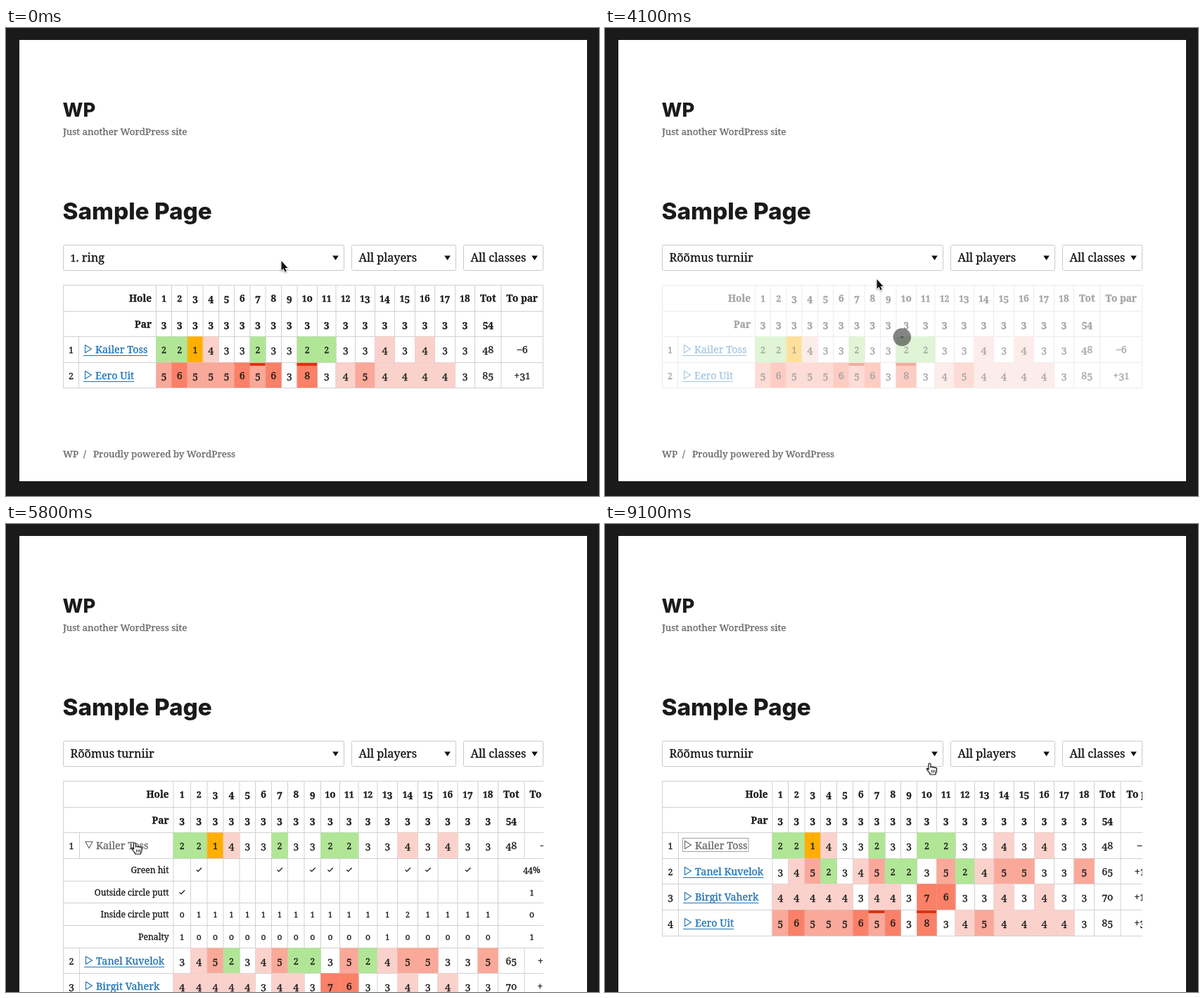
Write an HTML page with a canvas that moves like this. It is 843x665 px and loops after 9400 ms.

```html
<!DOCTYPE html>
<html lang="en">
<head>
<meta charset="utf-8">
<title>Sample Page</title>
<style>
html, body { margin: 0; width: 100%; height: 100%; overflow: hidden; background: #1a1a1a; }
canvas { display: block; width: 843px; height: 665px; }
</style>
</head>
<body>
<canvas id="stage" width="843" height="665"></canvas>
<script>
const ctx = document.getElementById('stage').getContext('2d');
const LOOP = 9400, STEP = 100;
const SERIF = '"Noto Serif", serif';
const INK = '#1a1a1a', GREY = '#686868', LINE = '#d1d1d1', LINK = '#1f73b4';

const T = { pick: 1800, faded: 2600, swap: 4200, shown: 4500, hover: 5300, open: 5800, close: 7900, leave: 8700 };

const players = {
  a: { name: 'Kailer Toss', scores: '221433233223343433', total: '48', par: '−6' },
  b: { name: 'Tanel Kuvelok', scores: '345234522352455335', total: '65', par: '+11' },
  c: { name: 'Birgit Vaherk', scores: '444443443763343433', total: '70', par: '+16' },
  d: { name: 'Eero Uit', scores: '565556563834544443', total: '85', par: '+31', marks: [6, 9] }
};

// v marks a tick, a blank leaves the cell empty
const details = [
  ['Green hit', ' v    v vvv  vv v ', '44%'],
  ['Outside circle putt', 'v                 ', '1'],
  ['Inside circle putt', '011111111111121111', '0'],
  ['Penalty', '100000000000100000', '1']
];

// Left edge of each column, then the right edge of the table
const layouts = {
  small: [81, 103, 213, 235, 257.5, 279.5, 302, 324, 346.5, 368.5, 391, 413.5, 442, 468.5, 496, 524, 552, 581, 609, 638, 666, 703.5, 763],
  wide: [81, 104, 237.5, 260, 283.5, 306, 329, 352, 374.5, 397.5, 420, 443, 471, 497.5, 525, 552.5, 581, 610, 638, 666.5, 695, 732.5, 794],
  open: [81, 104, 237.5, 262, 285.5, 308.5, 331.5, 354, 377, 400, 423.5, 447, 474, 500.5, 527.5, 556, 585, 613.5, 641.5, 670.5, 699, 736.5, 796]
};

const pointerKeys = [
  [0, 391, 331], [200, 390, 338], [900, 390, 338], [1100, 388, 344], [1300, 388, 344],
  [1500, 386, 357], [4700, 386, 357], [5000, 214, 430], [5400, 183.5, 453],
  [8600, 183.5, 453], [9100, 462, 340]
];

const arrowShape = new Path2D('M.5 0V13.5L3.4 10.8L5.6 15.6L7.8 14.6L5.6 10H9.6Z');
const handShape = new Path2D('M-2 9V1.5a1.5 1.5 0 0 1 3 0V6q0-1 1.5-1t1.6 1.2q0-.8 1.4-.8t1.5 1.3' +
  'q0-.6 1.2-.6t1.3 1.5V11q0 2-1.5 3.5V16H0V14.5q-2-2-4-5q-1.2-2 .2-2.5Z');
const handLines = new Path2D('M2.2 9.5v4M4.6 9.5v4M7 9.5v4');

const clamp = v => Math.max(0, Math.min(1, v));
const smooth = u => u * u * (3 - 2 * u);

function rect(x, y, w, h, color) {
  ctx.fillStyle = color;
  ctx.fillRect(x, y, w, h);
}

function polygon(points) {
  ctx.beginPath();
  points.forEach(([x, y]) => ctx.lineTo(x, y));
  ctx.closePath();
}

// Splits text into parts so that figures sit in old style
function parts(str, size, weight) {
  return str.split(/(\d)/).filter(Boolean).map(s => {
    const low = /^[12]$/.test(s);
    const text = s === '0' ? 'o' : s;
    const font = `${weight} ${low ? size * 0.88 : size}px ${SERIF}`;
    ctx.font = font;
    return { text, font, width: ctx.measureText(text).width, drop: /^[34579]$/.test(s) ? size * 0.14 : 0 };
  });
}

// A hairline stroke gives the sturdier strokes of a screen serif
function text(str, x, y, { size = 14.3, weight = 400, color = INK, align = 0 } = {}) {
  const list = parts(str, size, weight);
  const width = list.reduce((sum, p) => sum + p.width, 0);
  let pos = x - width * align;
  ctx.fillStyle = ctx.strokeStyle = color;
  ctx.lineWidth = 0.3;
  for (const p of list) {
    ctx.font = p.font;
    ctx.fillText(p.text, pos, y + p.drop);
    ctx.strokeText(p.text, pos, y + p.drop);
    pos += p.width;
  }
  return pos;
}

function heading(str, y, size) {
  ctx.font = `800 ${size}px Inter, sans-serif`;
  ctx.fillStyle = INK;
  ctx.fillText(str, 80.5, y);
}

function select(x, right, label, arrowX) {
  ctx.strokeStyle = '#c9c9c9';
  ctx.lineWidth = 1;
  ctx.beginPath();
  ctx.roundRect(x + 0.5, 308.5, right - x - 1, 36, 2);
  ctx.stroke();
  text(label, x + 10.5, 332, { size: 16.3, color: '#111' });
  polygon([[arrowX - 4.3, 323.5], [arrowX + 4.3, 323.5], [arrowX, 330]]);
  ctx.fillStyle = '#111';
  ctx.fill();
}

function scoreColor(score) {
  return [null, '#ffb000', '#b1e697', null, '#fad2cc', '#fba999'][score] || (score > 5 ? '#fa8068' : null);
}

function fillScores(scores, cols, top, height) {
  [...scores].forEach((s, i) => {
    const x = cols[i + 2];
    const color = scoreColor(+s);
    if (color) rect(x, top, cols[i + 3] - x + 1, height, color);
  });
}

function checkMark(x, y) {
  ctx.strokeStyle = INK;
  ctx.lineWidth = 1.3;
  ctx.beginPath();
  ctx.moveTo(x - 3.5, y + 0.5);
  ctx.lineTo(x - 1.2, y + 2.7);
  ctx.lineTo(x + 3.8, y - 2.5);
  ctx.stroke();
}

function nameLink(name, x, top, state) {
  const color = state.active ? GREY : LINK;
  const cy = top + 18;
  polygon(state.open
    ? [[x + 2, cy - 4.5], [x + 12, cy - 4.5], [x + 7, cy + 4.5]]
    : [[x + 2.5, cy - 5.5], [x + 11.5, cy], [x + 2.5, cy + 5.5]]);
  ctx.strokeStyle = color;
  ctx.lineWidth = 1.1;
  ctx.stroke();
  const right = text(name, x + 17, top + 23.5, { color });
  if (!state.active) rect(x, top + 27, right - x, 1, color);
  if (state.focus) {
    ctx.setLineDash([1, 1]);
    ctx.lineWidth = 1;
    ctx.strokeStyle = '#444';
    ctx.strokeRect(x - 0.5, top + 8.5, right - x + 2, 19);
    ctx.setLineDash([]);
  }
}

function drawTable(cols, rows, t) {
  const mid = i => (cols[i] + cols[i + 1]) / 2 + 0.5;
  const end = cols[22];
  let exact = 365;

  ctx.save();
  ctx.beginPath();
  ctx.rect(80, 360, 684, 305);
  ctx.clip();

  for (const row of rows) {
    const top = Math.round(exact);
    exact += row.detail ? 31.75 : 36.6;
    const height = Math.round(exact) - top;
    const base = top + 24;

    if (row.player) fillScores(row.player.scores, cols, top, height);

    const skip = row.player ? [] : row.detail ? [1, 21] : [1];
    rect(cols[0], top, end - cols[0] + 1, 1, LINE);
    cols.forEach((x, i) => { if (!skip.includes(i)) rect(x, top, 1, height, LINE); });

    if (row.player) {
      const { name, scores, total, par, marks = [] } = row.player;
      // A second pass tints the grid lines inside coloured cells
      ctx.globalAlpha = 0.6;
      fillScores(scores, cols, top, height);
      ctx.globalAlpha = 1;
      marks.forEach(i => rect(cols[i + 2], top + 1, cols[i + 3] - cols[i + 2], 4, '#e0320f'));

      const first = row.rank === 1;
      nameLink(name, cols[1] + 7, top, {
        active: first && t >= T.hover,
        focus: first && t >= T.leave,
        open: first && t >= T.open && t < T.close
      });
      const put = (str, i) => text(str, mid(i), base - 0.5, { align: 0.5 });
      put(String(row.rank), 0);
      [...scores].forEach((s, i) => put(s, i + 2));
      put(total, 20);
      put(par, 21);
    } else if (row.detail) {
      const [label, cells, sum] = row.detail;
      const style = { size: 12.1, align: 0.5 };
      text(label, cols[2] - 6, top + 20.5, { ...style, align: 1 });
      [...cells].forEach((c, i) => {
        if (c === 'v') checkMark(mid(i + 2), top + 16);
        else if (c !== ' ') text(c, mid(i + 2), top + 20.5, style);
      });
      text(sum, (cols[20] + end) / 2, top + 20.5, style);
    } else {
      const style = { size: 13.6, weight: 700, align: 0.5 };
      text(row.label, cols[2] - 6, base, { ...style, align: 1 });
      row.cells.forEach((c, i) => text(c, mid(i + 2), base, style));
    }
  }

  const bottom = Math.round(exact);
  rect(cols[0], bottom, end - cols[0] + 1, 1, LINE);
  ctx.restore();
  return bottom;
}

const holes = Array.from({ length: 18 }, (_, i) => String(i + 1));
const head = [
  { label: 'Hole', cells: [...holes, 'Tot', 'To par'] },
  { label: 'Par', cells: [...holes.map(() => '3'), '54'] }
];

function tableAt(t) {
  const keys = t < T.swap ? 'ad' : 'abcd';
  const open = t >= T.open && t < T.close;
  const rows = [...head];
  [...keys].forEach((k, i) => {
    rows.push({ player: players[k], rank: i + 1 });
    if (open && i === 0) details.forEach(detail => rows.push({ detail }));
  });
  return { rows, cols: layouts[t < T.swap ? 'small' : open ? 'open' : 'wide'] };
}

function opacityAt(t) {
  return t < T.swap
    ? 1 - 0.6 * clamp((t - T.pick) / (T.faded - T.pick))
    : 0.4 + 0.6 * clamp((t - T.swap) / (T.shown - T.swap));
}

// Two translucent discs that grow and shrink in turn
function spinner(t) {
  const phase = (((t - 2320) / 1000) % 2 + 2) % 2;
  const s = smooth(phase < 1 ? phase : 2 - phase);
  ctx.fillStyle = 'rgba(51,51,51,.6)';
  for (const scale of [1 - s, s]) {
    ctx.beginPath();
    ctx.arc(422.3, 439.3, 14.5 * scale, 0, Math.PI * 2);
    ctx.fill();
  }
}

function pointer(t) {
  const i = pointerKeys.findIndex(k => k[0] > t);
  const to = pointerKeys.at(i);
  const from = i > 0 ? pointerKeys[i - 1] : to;
  const u = to === from ? 0 : (t - from[0]) / (to[0] - from[0]);
  ctx.save();
  ctx.translate(from[1] + (to[1] - from[1]) * u, from[2] + (to[2] - from[2]) * u);
  ctx.lineJoin = 'round';
  if (t >= T.hover) {
    ctx.fillStyle = '#fff';
    ctx.fill(handShape);
    ctx.strokeStyle = '#111';
    ctx.lineWidth = 1.2;
    ctx.stroke(handShape);
    ctx.lineWidth = 1;
    ctx.stroke(handLines);
  } else {
    ctx.strokeStyle = '#fff';
    ctx.lineWidth = 2;
    ctx.shadowColor = 'rgba(0,0,0,.35)';
    ctx.shadowBlur = 2;
    ctx.shadowOffsetY = 1;
    ctx.stroke(arrowShape);
    ctx.shadowColor = 'transparent';
    ctx.fillStyle = '#111';
    ctx.fill(arrowShape);
  }
  ctx.restore();
}

function draw(t) {
  rect(0, 0, 843, 665, INK);
  rect(19, 17, 807, t < T.swap ? 627 : 648, '#fff');

  const { cols, rows } = tableAt(t);
  const bottom = drawTable(cols, rows, t);
  const opacity = opacityAt(t);
  if (opacity < 1) rect(80, 364, 685, Math.min(bottom, 664) - 362, `rgba(255,255,255,${1 - opacity})`);

  heading('WP', 126, 27.3);
  text('Just another WordPress site', 81, 152, { size: 13.4, color: GREY });
  heading('Sample Page', 271.5, 33.3);
  select(81, 481, t < T.pick ? '1. ring' : 'Rõõmus turniir', 468.5);
  select(491, 640, 'All players', 627.5);
  select(650, 764, 'All classes', 751.5);

  const foot = { size: 13.4, color: GREY };
  text('WP', 81, bottom + 99, foot);
  text('/', 110, bottom + 99, foot);
  text('Proudly powered by WordPress', 124, bottom + 99, foot);

  if (t >= T.pick && t < T.swap) spinner(t);
  pointer(t);
}

const start = performance.now();
function loop() {
  const t = (performance.now() - start) % LOOP;
  draw(Math.floor(t / STEP) * STEP);
  requestAnimationFrame(loop);
}
loop();
</script>
</body>
</html>
```
